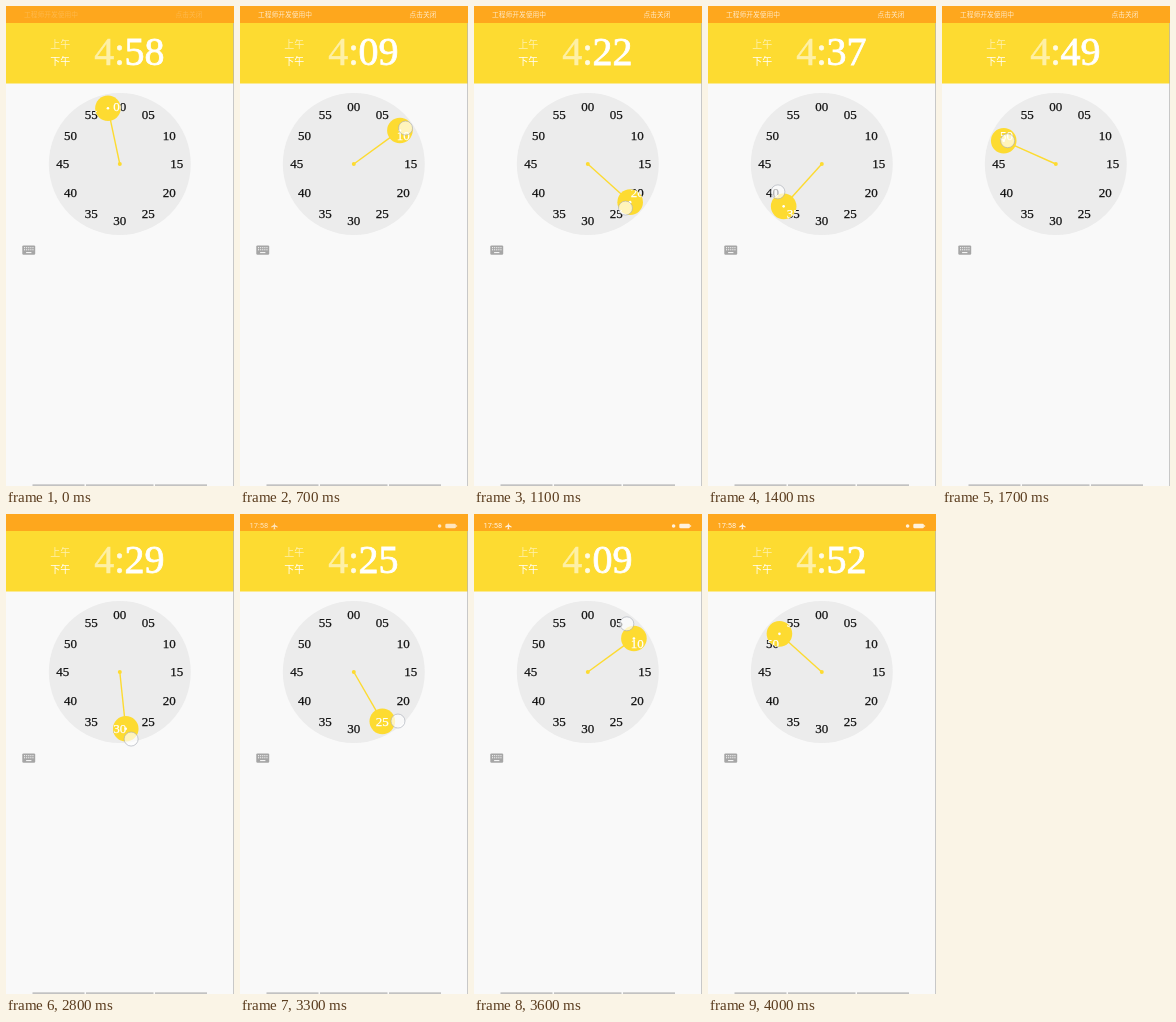
An HTML page with a canvas for the animation above (4900 ms loop, 228x480 px).

```html
<!DOCTYPE html>
<html lang="zh">
<head>
<meta charset="utf-8">
<title>Time picker</title>
<style>
html, body { margin: 0; width: 100%; height: 100%; overflow: hidden; background: #f9f9f9; }
canvas { display: block; width: 228px; height: 480px; }
</style>
</head>
<body>
<canvas id="stage"></canvas>
<script>
const W = 228, H = 480, LOOP = 4900, STEP = 100;
const CX = 113.8, CY = 158, RING = 57, KNOB = 12.8;
const YELLOW = '#fddb31', ORANGE = '#fea71d';
const SERIF = '"Liberation Serif", serif';
const SANS = '"Noto Sans CJK SC", "Noto Sans CJK", sans-serif';

// step, hand minute, finger minute, finger distance from the centre
const path = [
  [0, -2, -2, 57], [2, -2, -1.5, 57], [4, 1, 2, 60], [7, 9, 9.2, 63],
  [10, 18, 19, 60], [12, 25, 27.5, 56], [14, 37, 39.6, 52],
  [16, 47, 48.5, 53], [18, 50, 50.1, 54], [23, 50, 50, 54],
  [26, 35, 33.5, 57], [28, 29, 28.4, 68], [32, 28, 28, 68],
  [33, 25, 23, 66], [36, 9, 6.5, 62], [38, -8, -7.7, 47], [49, -8, -7.7, 47]
];

const canvas = document.getElementById('stage');
const ctx = canvas.getContext('2d');
const dpr = window.devicePixelRatio || 1;
canvas.width = W * dpr;
canvas.height = H * dpr;

const clamp = v => Math.max(0, Math.min(1, v));
const white = a => `rgba(255,255,255,${a})`;
const pad = n => String(n).padStart(2, '0');

function pose(step) {
  const i = Math.max(1, path.findIndex(k => k[0] >= step));
  const a = path[i - 1], b = path[i];
  const p = (step - a[0]) / (b[0] - a[0]);
  return a.map((v, j) => v + (b[j] - v) * p);
}

function polar(minute, r) {
  const a = minute * Math.PI / 30;
  return [CX + r * Math.sin(a), CY - r * Math.cos(a)];
}

function rect(x, y, w, h, color) {
  ctx.fillStyle = color;
  ctx.fillRect(x, y, w, h);
}

function disc(x, y, r, color) {
  ctx.fillStyle = color;
  ctx.beginPath();
  ctx.arc(x, y, r, 0, Math.PI * 2);
  ctx.fill();
}

function roundRect(x, y, w, h, r, color) {
  ctx.fillStyle = color;
  ctx.beginPath();
  ctx.roundRect(x, y, w, h, r);
  ctx.fill();
}

function text(s, x, y, font, color, align = 'center', weight = 0) {
  ctx.font = font;
  ctx.textAlign = align;
  ctx.fillStyle = color;
  ctx.fillText(s, x, y);
  if (weight) {
    ctx.strokeStyle = color;
    ctx.lineWidth = weight;
    ctx.strokeText(s, x, y);
  }
}

function drawNotice(alpha) {
  if (!alpha) return;
  const font = '6.75px ' + SANS;
  text('工程师开发使用中', 18, 11.3, font, white(alpha), 'left');
  text('点击关闭', 169.5, 11.3, font, white(alpha), 'left');
}

function drawStatus(alpha) {
  if (!alpha) return;
  const color = white(0.85);
  ctx.save();
  ctx.globalAlpha = alpha;
  text('17:58', 9.5, 14.4, '7.5px Roboto, sans-serif', color, 'left');
  ctx.beginPath();
  [[34.4, 8.6], [35, 11], [37.6, 12.6], [37.6, 13.4], [35, 12.7], [34.9, 14.2],
   [35.8, 15.2], [33, 15.2], [33.9, 14.2], [33.8, 12.7], [31.2, 13.4],
   [31.2, 12.6], [33.8, 11]].forEach(p => ctx.lineTo(...p));
  ctx.fill();
  disc(199.6, 12, 1.8, color);
  roundRect(205.3, 9.7, 10.6, 4.6, 1.4, color);
  rect(216.3, 11, 0.8, 2, color);
  ctx.restore();
}

function drawHeader(minute) {
  rect(0, 0, W, 17, ORANGE);
  rect(0, 17, W, 60.5, YELLOW);
  text('上午', 54.3, 41.6, '10px ' + SANS, white(0.62));
  text('下午', 54.3, 58.6, '10px ' + SANS, '#fff');
  const big = '40px ' + SERIF;
  text('4', 98.3, 58.6, big, '#fef0a6', 'center', 0.5);
  text(':', 113.6, 58.6, big, '#fffbe2', 'center', 0.5);
  text(pad(minute), 138.5, 58.6, big, '#fff', 'center', 0.8);
}

function drawLabels(color) {
  for (let m = 0; m < 60; m += 5) {
    const [x, y] = polar(m, RING);
    text(pad(m), x, y + 4.2, '13px ' + SERIF, color, 'center', 0.25);
  }
}

function drawDial(minute) {
  const [x, y] = polar(minute, RING);
  disc(CX, CY, 71, '#ececec');
  drawLabels('#111');
  ctx.strokeStyle = YELLOW;
  ctx.lineWidth = 1.4;
  ctx.beginPath();
  ctx.moveTo(CX, CY);
  ctx.lineTo(...polar(minute, RING - KNOB + 1));
  ctx.stroke();
  disc(CX, CY, 2, YELLOW);
  disc(x, y, KNOB, YELLOW);
  ctx.save();
  ctx.clip();
  drawLabels('#fff');
  ctx.restore();
  if (minute % 5) disc(x, y, 1.3, '#fff');
}

function drawTouch(minute, r, alpha) {
  if (!alpha) return;
  const [x, y] = polar(minute, r);
  ctx.save();
  ctx.globalAlpha = alpha;
  disc(x, y, 7, white(0.68));
  ctx.strokeStyle = 'rgba(165,170,180,0.75)';
  ctx.lineWidth = 0.8;
  ctx.stroke();
  ctx.restore();
}

function drawKeyboard() {
  roundRect(16.3, 239.4, 12.9, 9.4, 1.2, '#a6a6a6');
  for (let row = 0; row < 2; row++)
    for (let col = 0; col < 5; col++)
      rect(18 + col * 2.1, 241.1 + row * 2.1, 1.1, 1.1, '#f4f4f4');
  rect(20.1, 246, 5.3, 1.1, '#f4f4f4');
}

function touchAlpha(step) {
  if (step === 39) return 0.4;
  return (step >= 2 && step < 19) || (step >= 24 && step < 39) ? 1 : 0;
}

function draw(step) {
  const [, hand, finger, reach] = pose(step);
  const minute = (Math.round(hand) + 60) % 60;
  const notice = step < 20
    ? 0.2 + 0.55 * clamp(step / 4)
    : 0.75 * clamp((24.5 - step) / 4.5);

  ctx.setTransform(dpr, 0, 0, dpr, 0, 0);
  rect(0, 0, W, H, '#f9f9f9');
  drawHeader(minute);
  drawNotice(notice);
  drawStatus(clamp((step - 28) / 6));
  drawDial(minute);
  drawTouch(finger, reach, touchAlpha(step));
  drawKeyboard();
  rect(227.3, 17, 0.7, H - 17, '#b4b4b4');
  [[26.5, 52], [80, 67.5], [149, 52]].forEach(([x, w]) => rect(x, 478.3, w, 1.7, '#c2c2c2'));
}

const start = performance.now();
function tick() {
  draw(Math.floor(((performance.now() - start) % LOOP) / STEP));
  requestAnimationFrame(tick);
}
tick();
</script>
</body>
</html>
```
